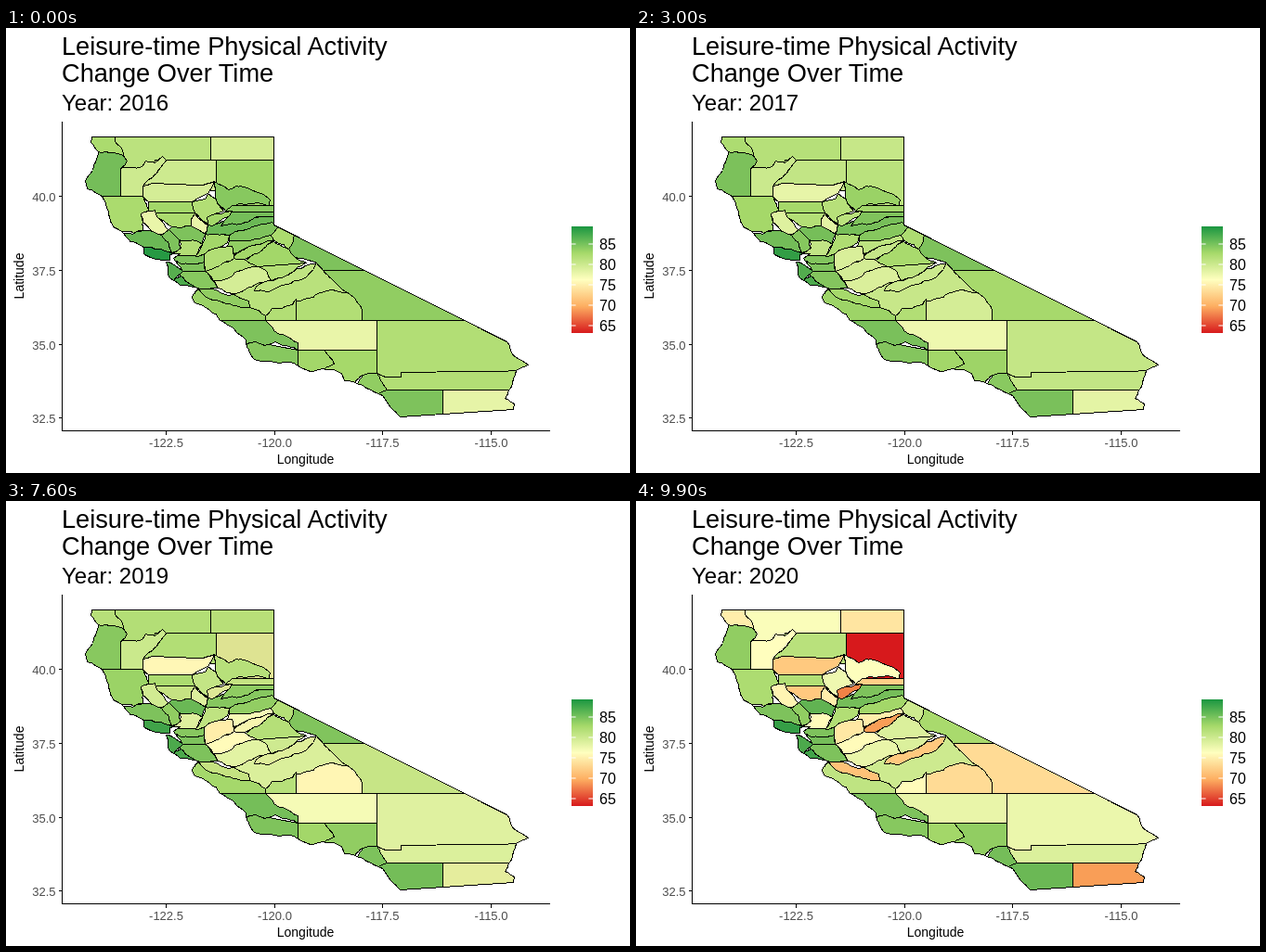
Animation, 672 px wide and 480 px high, one loop 10 s. Source, as an HTML page:

```html
<!DOCTYPE html>
<html lang="en">
<head>
<meta charset="utf-8">
<title>Leisure-time Physical Activity</title>
<style>
  html, body { margin: 0; width: 100%; height: 100%; overflow: hidden; background: #fff; }
  svg { display: block; width: 672px; height: 480px; font-family: Arial, "Liberation Sans", sans-serif; }
  #map polygon { stroke: #000; stroke-width: 1; shape-rendering: crispEdges; }
  #outline, .axis { fill: none; }
  .axis { stroke: #000; shape-rendering: crispEdges; }
  .tick { font-size: 13px; fill: #4d4d4d; }
  .name { font-size: 14px; text-anchor: middle; }
  .key { font-size: 16px; }
</style>
</head>
<body>
<svg viewBox="0 0 672 480">
  <defs>
    <clipPath id="land"><polygon id="shore"/></clipPath>
    <linearGradient id="ramp" x1="0" y1="1" x2="0" y2="0"></linearGradient>
  </defs>

  <text x="60" y="29" font-size="27.2">Leisure-time Physical Activity</text>
  <text x="60" y="58" font-size="27.2">Change Over Time</text>
  <text id="year" x="60" y="89" font-size="24"></text>

  <!-- Later areas cover earlier ones; all are clipped to the coast.
       data-v: the value in the first year, the fourth and the last. -->
  <g id="map" transform="translate(.5 .5)">
    <g id="areas" clip-path="url(#land)">
      <polygon data-v="81.3 82.3 76.7" points="100,110 220,110 220,142 172,142 160,155 110,155"/>
      <polygon data-v="79.5 82 74.3" points="220,110 300,110 300,142 220,142"/>
      <polygon data-v="80 82 81.5" points="160,142 226,142 226,175 140,175"/>
      <polygon data-v="83 79 63.4" points="226,142 300,142 300,195 226,195"/>
      <polygon data-v="85.5 84.5 84" points="70,133 98,133 126,137 130,143 123,151 123,181 70,181"/>
      <polygon data-v="82.5 82 75" points="80,110 117,110 117,121 124,129 126,137 98,133 80,133"/>
      <polygon data-v="80 80.5 76.3" points="123,151 146,149 150,143 160,145 168,138 172,142 157,161 147,170 147,181 123,181"/>
      <polygon data-v="79.5 76 72" points="147,170 157,167 205,169 224,165 217,178 200,187 153,187 147,181"/>
      <polygon data-v="83 82.5 82" points="153,187 203,187 203,199 153,199"/>
      <polygon data-v="84.5 82 76.5" points="224,165 239,174 247,170 268,176 284,185 283,191 243,192 236,197 226,185"/>
      <polygon data-v="82 81 77.5" points="214,184 217,178 226,185 234,197 216,204 217,211 203,199 200,187"/>
      <polygon data-v="82.5 83.5 82.3" points="80,181 147,181 154,197 145,200 147,218 124,219 90,230"/>
      <polygon data-v="82.5 81 72" points="160,199 203,199 199,213 178,214 163,204"/>
      <polygon data-v="78 80 75.5" points="145,200 160,196 163,204 178,221 160,222 147,209"/>
      <polygon data-v="78 79 75" points="199,206 203,200 217,212 214,221 207,221 199,213"/>
      <polygon data-v="84.5 81 72.5" points="236,197 243,191 300,191 300,198 243,198"/>
      <polygon data-v="86 84.5 85.5" points="217,212 252,206 300,200 300,212 272,212 240,223 215,222"/>
      <polygon data-v="85.5 84 85" points="243,198 300,198 300,203 270,203 231,213 239,203"/>
      <polygon data-v="83 79 67.5" points="216,204 243,197 239,203 222,213 217,212"/>
      <polygon data-v="85 84 83" points="240,223 272,212 288,210 297,217 284,224 262,229 240,229"/>
      <polygon data-v="85 85 82.6" points="300,215 420,261 341,261 334,253 311,247 304,238"/>
      <polygon data-v="82.5 82 80" points="284,224 297,210 310,223 304,238 290,230"/>
      <polygon data-v="84 80.8 73.5" points="341,261 430,261 520,315 383,315 383,304 367,285 353,273"/>
      <polygon data-v="81.5 79 80" points="240,284 334,253 341,261 353,273 367,285 312,310 279,310 262,301 250,294"/>
      <polygon data-v="79.5 78.5 78" points="223,272 246,263 270,257 281,263 286,271 258,281 245,286 228,280"/>
      <polygon data-v="81 79 72" points="267,283 272,276 288,272 308,263 334,253 331,260 311,272 280,284"/>
      <polygon data-v="82 80 79" points="270,257 322,253 308,263 286,272 281,263"/>
      <polygon data-v="83 82 79" points="258,250 288,230 304,238 311,247 323,253 270,257"/>
      <polygon data-v="84 77 75" points="238,237 240,229 262,229 284,223 288,229 262,236 246,243"/>
      <polygon data-v="83 77 69" points="243,246 262,235 287,229 268,243 256,249 247,249"/>
      <polygon data-v="82 76 76" points="214,262 245,248 258,250 270,257 246,263 231,272 223,272"/>
      <polygon data-v="82 75 74.5" points="213,244 217,239 243,235 245,248 230,256 214,262"/>
      <polygon data-v="82 75.8 73.5" points="312,294 335,286 367,285 378,296 383,304 383,315 312,315"/>
      <polygon data-v="82 82 76" points="279,310 286,302 308,298 312,292 312,315 279,315"/>
      <polygon data-v="83.5 83 81" points="180,284 207,281 240,297 262,301 279,310 279,315 190,315"/>
      <polygon data-v="84 81 71.5" points="205,281 214,279 245,287 261,294 262,301 240,297 213,288"/>
      <polygon data-v="84.5 85 85" points="184,262 214,262 228,280 207,281 188,267"/>
      <polygon data-v="87.5 87.5 88" points="181,270 188,267 207,281 195,290 170,280"/>
      <polygon data-v="87 87.5 87.5" points="165,248 180,248 190,262 181,270 178,278 165,278"/>
      <polygon data-v="85 85 85.5" points="178,250 213,252 214,262 190,262"/>
      <polygon data-v="85 84.5 85" points="176,244 213,243 213,252 190,254 178,250"/>
      <polygon data-v="85 86 86.5" points="175,217 178,214 199,213 214,222 211,234 186,228"/>
      <polygon data-v="85 84 84" points="167,223 175,217 186,228 188,238 178,242"/>
      <polygon data-v="82 79 76" points="180,242 188,237 186,228 205,229 211,233 205,245 180,245"/>
      <polygon data-v="86 85 85" points="110,219 147,218 167,223 178,242 156,236 135,236"/>
      <polygon data-v="89 88 88.5" points="140,236 156,236 178,242 178,252 140,252"/>
      <polygon data-v="83 81 82" points="214,222 240,223 238,231 217,240 204,246 211,233"/>
      <polygon data-v="84.5 85 84.5" points="240,342 267,338 314,347 314,370 250,370"/>
      <polygon data-v="85 85.5 85" points="215,315 279,315 288,326 314,339 314,347 290,338 278,342 267,338 240,345"/>
      <polygon data-v="78 77 78" points="279,315 399,315 399,347 314,347 314,339 288,326"/>
      <polygon data-v="82.8 84 84" points="342,347 399,347 399,372 384,374 370,392 330,392"/>
      <polygon data-v="83 83 83" points="314,347 342,347 353,362 338,371 338,380 314,380"/>
      <polygon data-v="82 78.8 77.8" points="399,315 520,315 580,340 580,369 425,371 425,376 408,376 399,372"/>
      <polygon data-v="82 79 79" points="399,372 408,376 425,376 425,371 580,369 580,390 410,390"/>
      <polygon data-v="84 85 85.5" points="384,374 399,372 410,390 402,398 370,396"/>
      <polygon data-v="85 85.5 86" points="395,398 410,390 470,390 470,425 400,425"/>
      <polygon data-v="78.2 78.5 69" points="470,390 580,390 580,425 470,425"/>
    </g>
    <polygon id="outline"/>
  </g>

  <path class="axis" d="M60.5 101V434.5H586"/>
  <g id="ticks"></g>
  <text class="name" x="322.5" y="470">Longitude</text>
  <text class="name" transform="translate(19 267.5) rotate(-90)">Latitude</text>

  <rect x="609" y="214" width="23" height="115" fill="url(#ramp)"/>
  <g id="legend"></g>
</svg>
<script>
const $ = id => document.getElementById(id);
const stops = ['#d7191c', '#fdae61', '#ffffbf', '#a6d96a', '#1a9641'];
const LOW = 63.4, HIGH = 89.3;

const coast = '92,117 91,123 99,133 93,153 85,165 87,173 103,181 110,197 115,214 124,219 148,236 148,243 170,250 ' +
  '176,250 176,244 187,243 180,248 189,261 179,254 172,252 175,268 187,277 207,280 200,290 202,295 230,315 ' +
  '247,327 258,336 262,350 267,357 301,360 329,370 361,372 364,380 374,381 405,396 415,410 424,419';
const inland = '546,411 547,405 537,399 541,390 549,369 562,363 546,353 539,338 288,212 288,117';

// Natural borders get seeded midpoint bends; surveyed lines stay straight.
const noise = (a, b) => {
  const n = Math.sin(a * 12.9898 + b * 78.233) * 43758.5453;
  return n - Math.floor(n) - .5;
};

function bend([x, y], [u, v]) {
  const d = Math.hypot(u - x, v - y);
  if (x === u || y === v || d < 5 || d > 45) return [[x, y]];
  const mid = [(x + u) / 2 + noise(x + u, y + v) * d * .2, (y + v) / 2 + noise(y + v, x + u) * d * .2];
  return [...bend([x, y], mid), ...bend(mid, [u, v])];
}

function rough(text) {
  const pts = text.split(' ').map(p => p.split(',').map(Number));
  return pts.flatMap((p, i) => bend(p, pts[(i + 1) % pts.length])).join(' ');
}

const mix = (a, b, t) => `color-mix(in lab, ${a}, ${b} ${(t * 100).toFixed(2)}%)`;
const lerp = (a, b, t) => a + (b - a) * t;

function shade(v) {
  const t = Math.min(4, Math.max(0, (v - LOW) / (HIGH - LOW) * 4));
  const k = Math.min(3, Math.floor(t));
  return mix(stops[k], stops[k + 1], t - k);
}

const border = rough(coast + ' ' + inland);
for (const id of ['shore', 'outline']) $(id).setAttribute('points', border);
$('ramp').innerHTML = stops.map((c, i) => `<stop offset="${i / 4}" stop-color="${c}"/>`).join('');

// A steady drift over three years, then one sharp last year.
const areas = [...$('areas').children].map(el => {
  const [first, fourth, final] = el.dataset.v.split(' ').map(Number);
  el.setAttribute('points', rough(el.getAttribute('points')));
  const values = [0, 1, 2, 3].map(y => lerp(first, fourth, y / 3)).concat(final);
  return { el, colors: values.map(shade) };
});

let ticks = '', marks = '';
for (let i = 0; i < 4; i++) {
  const x = Math.round(172 + i * 116.7) + .5, y = Math.round(181 + i * 79.8) + .5;
  ticks += `<path class="axis" d="M${x} 435v4M57 ${y}h3"/>
    <text class="tick" text-anchor="middle" x="${x}" y="452">${(-122.5 + i * 2.5).toFixed(1)}</text>
    <text class="tick" text-anchor="end" x="53.5" y="${y + 5}">${(40 - i * 2.5).toFixed(1)}</text>`;
}
for (let v = 65; v <= 85; v += 5) {
  const y = 321 - (v - 65) * 4.4;
  marks += `<path stroke="#fff" d="M609 ${y}h4.6M627.4 ${y}h4.6"/>
    <text class="key" x="639" y="${y + 6}">${v}</text>`;
}
$('ticks').innerHTML = ticks;
$('legend').innerHTML = marks;

let last = -1;
function draw(now) {
  const step = Math.floor(now % 10000 / 100);
  if (step !== last) {
    last = step;
    const pos = step * 4 / 99, k = Math.min(3, Math.floor(pos));
    for (const { el, colors } of areas) el.style.fill = mix(colors[k], colors[k + 1], pos - k);
    $('year').textContent = 'Year: ' + Math.round(2016 + pos);
  }
  requestAnimationFrame(draw);
}
draw(performance.now());
</script>
</body>
</html>
```
